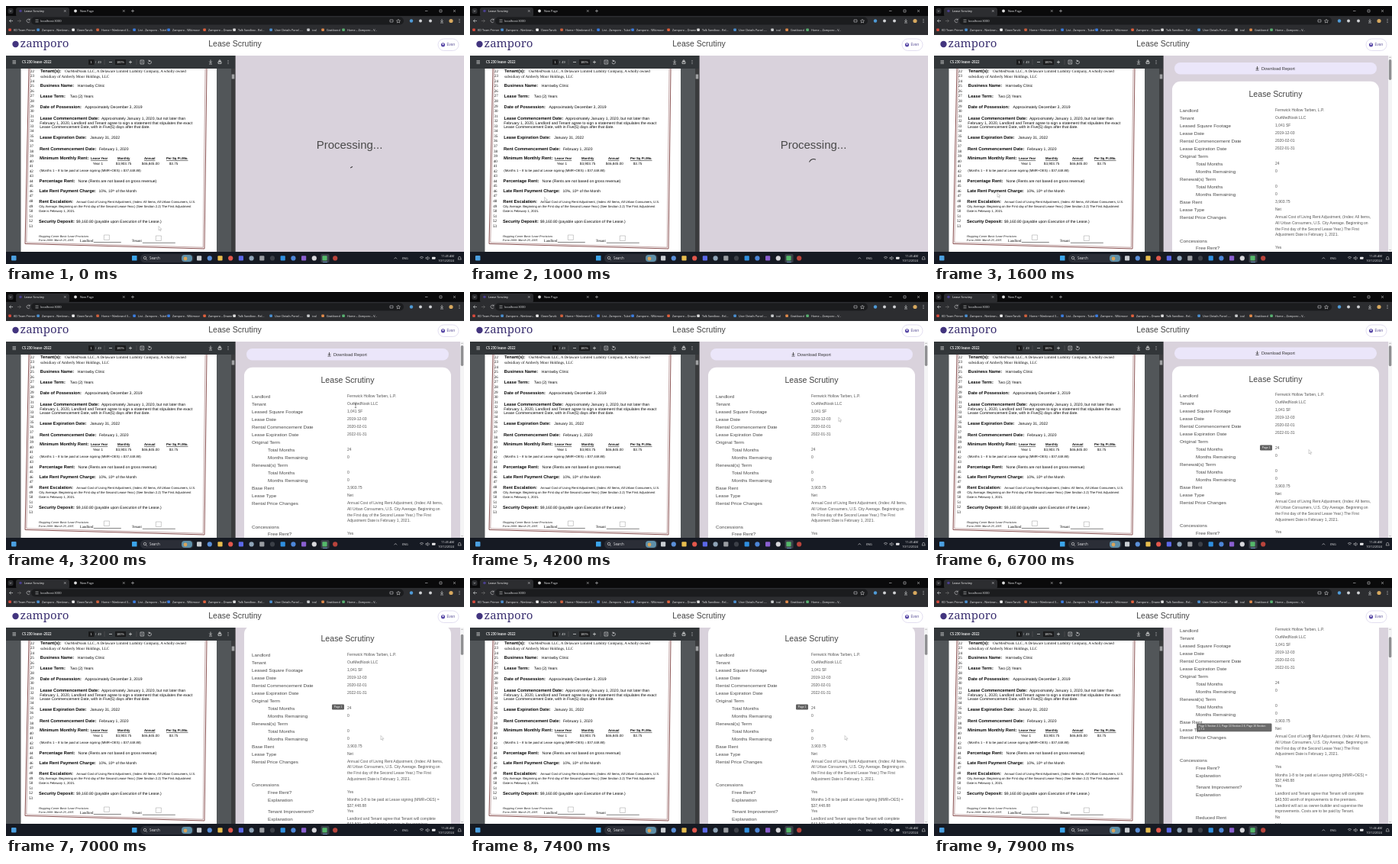
Animation, 600 px wide and 338 px high, one loop 8 s. Source, as an HTML page:

```html
<!DOCTYPE html>
<html lang="en">
<head>
<meta charset="utf-8">
<title>Lease Scrutiny</title>
<style>
html, body { margin: 0; width: 100%; height: 100%; overflow: hidden; background: #111; }
svg { display: block; width: 100vw; height: 100vh; }
text { white-space: pre; font-family: "Liberation Sans", Arial, sans-serif; }
.ui { font-family: "Open Sans", "Noto Sans", sans-serif; }
.serif { font-family: "Liberation Serif", serif; }
.logo { font-family: "Noto Serif", serif; }
</style>
</head>
<body>
<svg id="stage" viewBox="0 0 600 338"></svg>
<script>
const LOOP = 8000, RESULT_AT = 1200, CLOCK_AT = 5800;

// ---- markup helpers; y is the vertical middle of the text ----
const text = (x, y, s, size, fill, more = '') =>
  `<text x="${x}" y="${y + size * 0.35}" font-size="${size}" fill="${fill}" ${more}>${s}</text>`;
const rect = (x, y, w, h, fill, r = 0, more = '') =>
  `<rect x="${x}" y="${y}" width="${w}" height="${h}" rx="${r}" fill="${fill}" ${more}/>`;
const dot = (x, y, r, fill) => `<circle cx="${x}" cy="${y}" r="${r}" fill="${fill}"/>`;
const line = (d, color, w = 0.6) =>
  `<path d="${d}" fill="none" stroke="${color}" stroke-width="${w}"/>`;
const BOLD = 'font-weight="700"', MID = 'text-anchor="middle"', UI = 'class="ui"', SERIF = 'class="serif"';

function browser() {
  const ink = '#e6e7e9';
  const bookmarks = [
    [5, 'KD Team Primer', '#d94a3c'], [42, 'Zamporo - Nimbran...', '#4a8fd0'], [88, 'OwenTarvik', '#eee'],
    [120, 'Home • Nimbrand 3...', '#d0603c'], [168, 'List - Zamporo - Tukel', '#3b7de0'],
    [213, 'Zamporo - Wikimoor', '#3b7de0'], [260, 'Zamporo – Drawn', '#e0603c'],
    [299, 'Talk Sandbox - Rel...', '#ddd'], [347, 'User Details Panel -...', '#4a8fd0'],
    [396, 'ical', '#c8cacc'], [415, 'Gratibond', '#e08a4a'], [442, 'Home – Zamporo – V...', '#58b070']
  ];
  return rect(0, 0, 600, 13, '#0a0a0b') +
    rect(13, 2, 70, 12, '#2c2d30', 3) +
    rect(2.5, 3, 7, 7, '#2c2d30', 2) + line('M4.7 6l1.3 1.3 1.3-1.3', ink) +
    dot(19, 6.5, 1.8, '#4b3f8f') + text(24, 6.5, 'Lease Scrutiny', 3.9, '#fff', UI) +
    line('M76 5.2l2.6 2.6m0-2.6l-2.6 2.6', ink, 0.5) +
    dot(91, 6.5, 1.9, '#ddd') + text(97, 6.5, 'New Page', 3.9, ink, UI) +
    line('M153 5.2l2.6 2.6m0-2.6l-2.6 2.6M164 6.5h4m-2-2v4', ink, 0.5) +
    line('M549 6.5h3.5M568 5h3v3h-3zM586 5l3 3m0-3l-3 3', ink, 0.5) +
    rect(0, 13, 600, 25, '#2c2d30') +
    rect(33, 14.5, 488, 10, '#1b1c1e', 5) +
    line('M9 19.5H4.5m2-2l-2 2 2 2', ink) + line('M15 19.5h4.5m-2-2l2 2-2 2', '#777') +
    line('M31 18a2.2 2.2 0 1 0 .2 2.4M31.2 16.5v1.8h-1.8', ink, 0.5) +
    line('M38.5 18.2h4m-4 2.6h4', ink) + text(45, 19.5, 'localhost:3000', 4.1, ink, UI) +
    line('M503 18h4v3h-4zM514 17.3l.8 1.6 1.7.2-1.3 1.2.4 1.7-1.6-.9-1.6.9.4-1.7-1.3-1.2 1.7-.2z', ink, 0.5) +
    dot(531, 19.5, 2.2, '#4f9bd8') + dot(543, 19.5, 2, '#cfd1d4') + dot(556, 19.5, 2, '#cfd1d4') +
    line('M571 17v3.6m-1.7-1.5l1.7 1.7 1.7-1.7M569 22h4', ink) + dot(583, 19.5, 2.6, '#d7a85e') +
    [17.5, 19.5, 21.5].map(y => dot(594, y, 0.5, ink)).join('') +
    bookmarks.map(([x, s, c]) => rect(x - 1.7, 29.4, 3.6, 3.6, c, 0.8) + text(x + 5, 31.2, s, 3.75, '#f2f2f3', UI)).join('');
}

function header() {
  return rect(0, 38, 600, 27, '#fff') +
    dot(12.5, 50, 4.2, '#43357f') +
    text(18.5, 48.5, 'zamporo', 15, '#3d3272', 'class="logo"') +
    text(300, 49.5, 'Lease Scrutiny', 10.5, '#444', MID) +
    rect(566, 43, 27, 15.5, '#fff', 7.7, 'stroke="#d6d0ea" stroke-width=".7"') +
    dot(572.5, 50.8, 2.6, '#5a4aa8') + dot(572.5, 50, 0.9, '#fff') +
    text(577.5, 50.8, 'Evan', 4.6, '#5a4f96');
}

function scan() {
  const ink = '#080808';
  const label = (y, s) => text(43, y, s, 5.7, ink, BOLD);
  const body = (x, y, s, size = 5.06) => text(x, y, s, size, ink);
  let out = '';

  for (let n = 22; n <= 53; n++) out += text(32.5, 85 + (n - 22) * 6.55, n, 5, ink, SERIF + ' ' + MID);

  out += label(85, 'Tenant(s):') +
    text(75, 85, 'OurMedNook LLC, A Delaware Limited Liability Company, A wholly owned', 5.1, ink, SERIF) +
    text(43, 92, 'subsidiary of Amberly Moor Holdings, LLC', 5.1, ink, SERIF) +
    label(104, 'Business Name:') + body(92, 104, 'Harrowby Clinic') +
    label(118, 'Lease Term:') + body(82, 118, 'Two (2) Years') +
    label(132.5, 'Date of Possession:') + body(102, 132.5, 'Approximately December 3, 2019') +
    label(147, 'Lease Commencement Date:') +
    body(123.5, 147, 'Approximately January 1, 2020, but not later than') +
    body(43, 153, 'February 1, 2020, Landlord and Tenant agree to sign a statement that stipulates the exact') +
    body(43, 158.7, 'Lease Commencement Date, with in Five(5) days after that date.') +
    label(172, 'Lease Expiration Date:') + body(109, 172, 'January 31, 2022') +
    label(187, 'Rent Commencement Date:') + body(121, 187, 'February 1, 2020') +
    label(199, 'Minimum Monthly Rent:');

  [[110, 'Lease Year', 113, 'Year 1'], [145, 'Monthly', 143, '$3,903.75'],
   [180, 'Annual', 177, '$46,845.00'], [209, 'Per Sq Ft./Mo.', 213, '$3.75']].forEach(([x, head, vx, v]) => {
    out += text(x, 200, head, 4.3, ink, BOLD + ' text-decoration="underline"') + body(vx, 206, v, 4.6);
  });

  const italic = SERIF + ' font-style="italic"';
  return out + body(43.5, 216, '(Months 1 – 8 to be paid at Lease signing (MMR+OES) = $37,448.88)', 4.3) +
    label(229, 'Percentage Rent:') + body(94, 229, 'None (Rents are not based on gross revenue)') +
    label(242.5, 'Late Rent Payment Charge:') + body(121, 242.5, '10%, 10ᵗʰ of the Month', 4.9) +
    label(256.5, 'Rent Escalation:') +
    body(92, 257, 'Annual Cost of Living Rent Adjustment, (Index: All Items, All Urban Consumers, U.S.', 4.2) +
    body(43, 262.7, 'City Average. Beginning on the First day of the Second Lease Year.) (See Section 2.2) The First Adjustment', 4.2) +
    body(43, 268.5, 'Date is February 1, 2021.', 4.2) +
    label(282, 'Security Deposit:') + body(92, 282, '$9,160.80 (payable upon Execution of the Lease.)') +
    text(43, 301.5, 'Shopping Center Basic Lease Provisions', 4, ink, italic) +
    text(43, 307, 'Form 2000: March 29, 2005', 4, ink, italic) +
    text(97, 307.3, 'Landlord', 4.8, ink, SERIF) + text(165, 307.8, 'Tenant', 4.8, ink, SERIF) +
    line('M115 309.5H151M179 310.3H222', ink, 0.5) +
    line('M128.5 300h7v6.5h-7zM196.5 301h7v6.5h-7z', '#999', 0.5);
}

function pdf() {
  const tool = '#e4e5e6', border = '#8a5252';
  return rect(0, 65, 300, 257, '#525659') + rect(19.5, 80, 256.5, 243, '#fff') +
    // the scanned sheet leans a little
    line('M30 82L25 311.5L260 318L263 82', border, 1) +
    line('M31.8 82L26.8 309.8L258.2 316.2L261 82', border, 0.5) +
    `<g transform="matrix(1 0 -.01 1 2.9 0)">${scan()}</g>` +
    rect(0, 65, 300, 17, '#323639') +
    line('M8.5 71.7h4.5m-4.5 1.8h4.5m-4.5 1.8h4.5', tool, 0.7) +
    text(21, 73.5, 'CS 230 lease -2022', 4.4, '#fff', UI + ' font-weight="600"') +
    rect(108, 70, 7.5, 7, '#1a1b1c') + text(111.7, 73.5, '1', 4, '#fff', MID) +
    text(117, 73.5, '/  49', 4, tool) +
    line('M129 70v7M171 70v7', '#66686a', 0.4) +
    line('M135 73.5h4M161 73.5h4m-2-2v4', tool, 0.7) +
    rect(143, 70, 14, 7, '#1a1b1c') + text(150, 73.5, '100%', 4, '#fff', MID) +
    line('M176 71h4.6v5h-4.6zM178.3 72v3M187 71.8a2.2 2.2 0 1 1-1 2M187 70.5v2h2', tool, 0.6) +
    line('M268 70.5v3.8m-1.8-1.6l1.8 1.8 1.8-1.8M266 76h4M278 73h4v2.5h-4zM279 71h2v2h-2z', tool, 0.7) +
    [71.5, 73.5, 75.5].map(y => dot(291, y, 0.5, tool)).join('') +
    rect(295, 82, 5, 240, '#3a3b3d') + rect(295.7, 89.5, 3.6, 6, '#a0a1a3');
}

function report() {
  const label = (x, y, s) => text(x, y + 0.3, s, 6.25, '#484848');
  const lines = (y, ...rows) => rows.map((s, i) => text(447, y - 0.7 + i * 7.75, s, 5, '#555')).join('');
  const row = (y, name, ...value) => label(322, y, name) + lines(y, ...value);
  const sub = (y, name, ...value) => label(343, y, name) + lines(y, ...value);
  return rect(315, 74, 265, 15.5, '#ebe6fa', 7.7) +
    line('M423.5 79v3.6m-1.7-1.5l1.7 1.7 1.7-1.7M421.5 84h4', '#333', 0.8) +
    text(429, 81.8, 'Download Report', 5.7, '#333') +
    rect(312, 98.8, 271, 700, '#fff', 11) +
    text(447.5, 115.5, 'Lease Scrutiny', 10.6, '#444', MID) +
    row(137, 'Landlord', 'Fernwick Hollow Tarben, L.P.') +
    row(147, 'Tenant', 'OurMedNook LLC') +
    row(157, 'Leased Square Footage', '1,041 SF') +
    row(167, 'Lease Date', '2019-12-03') +
    row(177, 'Rental Commencement Date', '2020-02-01') +
    row(187, 'Lease Expiration Date', '2022-01-31') +
    row(197, 'Original Term') +
    sub(207, 'Total Months', '24') + sub(217, 'Months Remaining', '0') +
    row(227, 'Renewal(s) Term') +
    sub(237, 'Total Months', '0') + sub(247, 'Months Remaining', '0') +
    row(257, 'Base Rent', '3,903.75') +
    row(267, 'Lease Type', 'Net') +
    row(277, 'Rental Price Changes', 'Annual Cost of Living Rent Adjustment, (Index: All Items,',
      'All Urban Consumers, U.S. City Average. Beginning on',
      'the First day of the Second Lease Year.) The First', 'Adjustment Date is February 1, 2021.') +
    row(307.5, 'Concessions') +
    sub(317, 'Free Rent?', 'Yes') +
    sub(327.3, 'Explanation', 'Months 1-8 to be paid at Lease signing (MMR+OES) =', '$37,448.88') +
    sub(342.2, 'Tenant Improvement?', 'Yes') +
    sub(352, 'Explanation', 'Landlord and Tenant agree that Tenant will complete',
      '$43,500 worth of improvements to the premises.',
      'Landlord will act as owner-builder and supervise the', 'improvements. Costs are to be paid by Tenant.') +
    sub(382.5, 'Reduced Rent', 'No') + sub(392.3, 'Explanation', 'N/A') +
    `<g id="tip1">${rect(427, 202, 16, 7, '#616161', 1.2) + text(435, 205.5, 'Page 1', 3.4, '#fff', MID)}</g>` +
    `<g id="tip2">${rect(344, 259.3, 98.5, 10.7, '#6a6a6a', 1.2) +
      text(346.5, 262.7, 'Page 5 Section 2.1, Page 13 Section 2.6, Page 16 Section', 3.4, '#fff') +
      text(346.5, 267, '2.7.1', 3.4, '#fff')}</g>`;
}

function taskbar() {
  const ink = '#e8e8ea';
  const icons = ['#c9cdd2', '#5a8fd8', '#e8bd4e', '#e2574c', '#5b68e8', '#8fa4b8', '#9a9da2',
    '#3c4048', '#2f8fe0', '#4d86d8', '#8a5fd0', '#d8d8dc', '#54b86a', '#b8443c'];
  return rect(0, 322, 600, 16, '#161a23') +
    rect(7, 327, 6.5, 6.5, '#4b9fe0', 1) +
    rect(165, 327, 6.5, 6.5, '#3ba4ea', 0.6) +
    rect(176, 325, 70, 11, '#2b2e37', 5.5) +
    `<circle cx="182" cy="330" r="1.7" fill="none" stroke="${ink}" stroke-width=".6"/>` +
    line('M183.3 331.4l1.5 1.5', ink) + text(188, 330.5, 'Search', 4.4, ink, UI) +
    rect(230, 326, 14, 9, '#5e8fa8', 4) + dot(235, 331, 2.4, '#d9a45a') +
    rect(412.5, 325, 11, 11, '#3a3e48', 1.5) +
    icons.map((c, i) => rect(250 + i * 13.7, 327.3, 6.2, 6.2, c, i % 2 ? 3.1 : 1)).join('') +
    rect(415, 335.3, 6, 0.8, '#7fb7e8', 0.4) +
    line('M508.5 331.3l1.8-1.8 1.8 1.8', ink) + text(519, 330.3, 'ENG', 3.8, ink, UI) +
    line('M542 329.5q2.5-2.2 5 0M543.3 331q1.2-1.1 2.4 0', ink) +
    line('M550 329.5h1.2l1.5-1.3v4.2l-1.5-1.3H550zM554 329q1 1.3 0 2.6', ink, 0.5) +
    rect(558, 328.7, 4.5, 3, ink, 0.6) +
    text(587, 327.7, '11:45 AM', 3.9, ink, UI + ' id="clock" text-anchor="end"') +
    text(587, 333.3, '10/12/2024', 3.9, ink, UI + ' text-anchor="end"') +
    line('M592 332h4.4l-.7-1v-1.2a1.5 1.5 0 0 0-3 0v1.2z', ink, 0.5);
}

const stage = document.getElementById('stage');
stage.innerHTML = '<clipPath id="pane"><rect x="300" y="65" width="300" height="257"/></clipPath>' +
  pdf() + rect(300.5, 65, 299.5, 257, '#d9d2dc') +
  `<g id="wait">${text(450, 182, 'Processing...', 15, '#4a4a4a', MID)}
    <circle id="spin" r="5.74" pathLength="126.9" fill="none" stroke="#333" stroke-width="1"/></g>` +
  `<g id="result"><g clip-path="url(#pane)"><g id="scroll">${report()}</g></g>
    ${rect(595, 65, 5, 257, '#f4f4f5') + line('M596.4 68l1.1-1.2 1.1 1.2M596.4 319l1.1 1.2 1.1-1.2', '#777', 0.5)}
    ${rect(595.8, 70, 3.5, 27, '#8f8f92', 1.7, 'id="thumb"')}</g>` +
  header() + browser() + taskbar() +
  '<path id="arrow" d="M0 0V5.4L1.3 4.3 2.2 6.2 3.1 5.8 2.2 3.9H3.9Z" fill="#fff" stroke="#8a8a8a" stroke-width=".4"/>' +
  '<path id="beam" d="M-1.2-2.6H1.2M0-2.6V2.6M-1.2 2.6H1.2" stroke="#333" stroke-width=".5"/>';

// ---- motion ----
const $ = id => document.getElementById(id);
const show = (id, on) => $(id).setAttribute('visibility', on ? 'inherit' : 'hidden');
const place = (id, x, y, more = '') => $(id).setAttribute('transform', `translate(${x} ${y})${more}`);
const ease = u => (u = Math.min(1, Math.max(0, u)), u * u * (3 - 2 * u));
const ramp = (t, a, b) => ease((t - a) / (b - a));

// time, x, y
const path = [[0, 200, 288.5], [300, 200, 288.5], [1200, 83, 245], [1600, 83, 245], [1950, 455, 148],
  [2150, 455, 148], [2400, 462, 148], [3200, 457, 147], [3500, 457, 147], [4300, 484, 165],
  [4900, 501, 185], [5400, 501, 185], [6200, 491, 206.5], [LOOP, 491, 206.5]];

function pointer(t) {
  const i = path.findIndex(p => p[0] > t);
  const [t0, x0, y0] = path[i - 1], [t1, x1, y1] = path[i];
  const k = ramp(t, t0, t1);
  return [x0 + (x1 - x0) * k, y0 + (y1 - y0) * k];
}

function spinner(t) {
  const p = (t / 1400 + 0.1) % 1, half = ease(p * 2), rest = ease(p * 2 - 1);
  $('spin').setAttribute('stroke-dasharray', `${1 + 99 * half} 200`);
  $('spin').setAttribute('stroke-dashoffset', -15 * half - 110 * rest);
  place('spin', 450, 206.3, ` rotate(${42 + t / 1400 * 360})`);
}

function draw(t) {
  const ready = t >= RESULT_AT;
  show('wait', !ready);
  show('result', ready);
  spinner(t);

  const y = 36.5 * ramp(t, 6665, 6950) + 32.3 * ramp(t, 7450, 7750);
  place('scroll', 0, -y);
  place('thumb', 0, y * 0.105);
  show('tip1', ready && t >= 6350 && t < 7550);
  show('tip2', t >= 7750);
  $('clock').textContent = t < CLOCK_AT ? '11:45 AM' : '11:46 AM';

  const [px, py] = pointer(t);
  const overText = (t > 1900 && t < 3600) || t > 7700;
  show('arrow', !overText);
  show('beam', overText);
  place('arrow', px, py);
  place('beam', px + 1, py + 2);
}

function tick() {
  draw(performance.now() % LOOP);
  requestAnimationFrame(tick);
}
tick();
</script>
</body>
</html>
```
